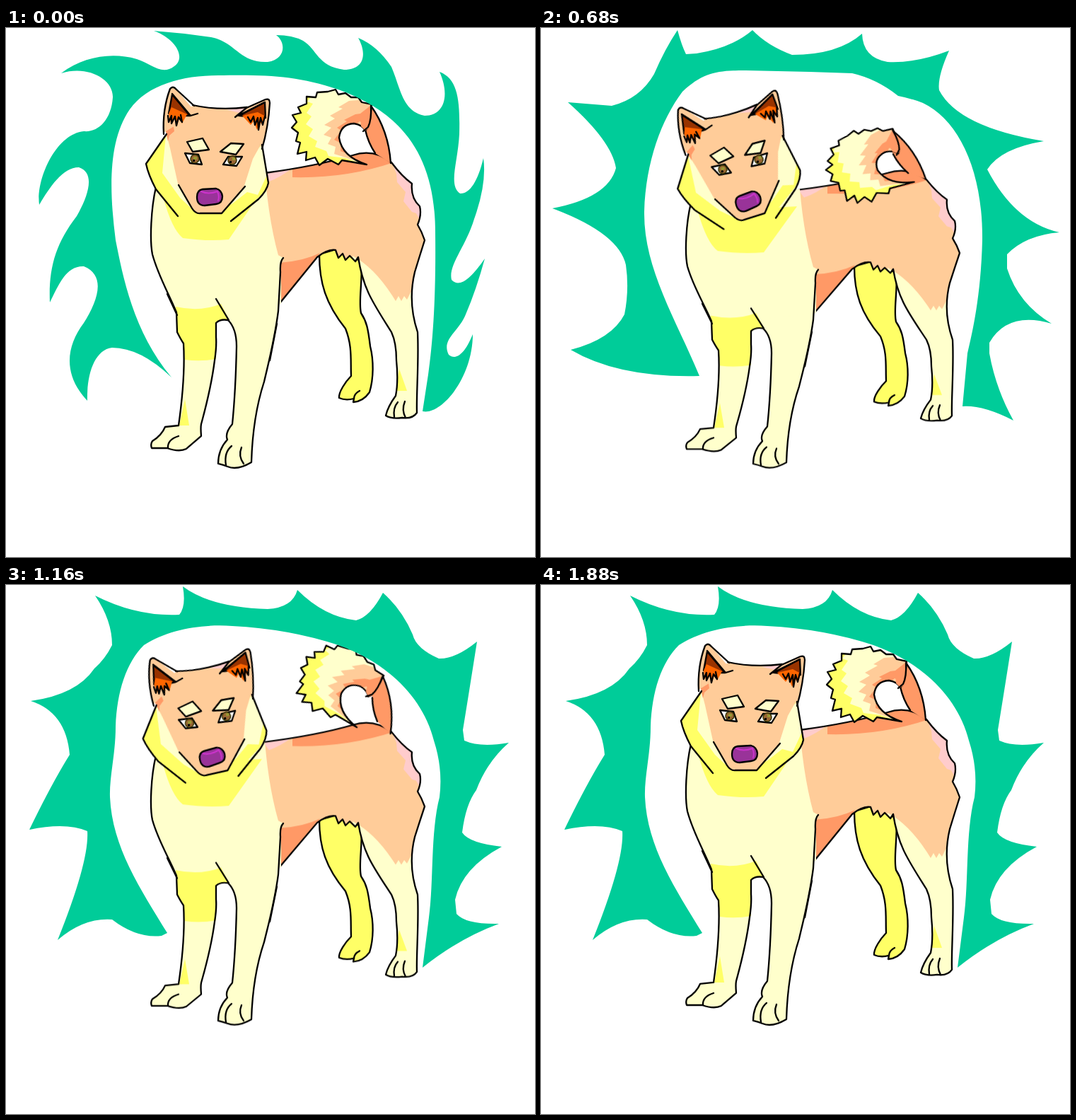
An HTML page without scripts for the animation above (1.92 s loop, 748 by 748 pixels).

```html
<!DOCTYPE html>
<html lang="en">
<head>
<meta charset="utf-8">
<title>Dog with green flames</title>
<style>
html, body { margin: 0; width: 100%; height: 100%; overflow: hidden; background: #fff; }
svg { display: block; width: 100%; height: 100%; }
path { stroke-linejoin: round; stroke-linecap: round; }

.line { fill: none; stroke: #000; stroke-width: 2.3; }
.ink { stroke: #000; stroke-width: 2.3; }
.tan { fill: #fc9; }
.orange { fill: #f96; }
.cream { fill: #ffc; }
.yellow { fill: #ff6; }
.pink { fill: #fcc; }
.rust { fill: #930; }
.fire { fill: #f60; }
.iris { fill: #963; stroke: #330; stroke-width: 1.5; }
.flames { fill: #0c9; }

:root {
  --in: cubic-bezier(.333, 0, .667, .333);
  --out: cubic-bezier(.333, .667, .667, 1);
}
.body, .head, .tail, .fluff { animation: 1.92s infinite; }

/* breathing: quadratic in, quadratic out */
.body { transform-origin: 0 620px; animation-name: breathe; }
.head { transform-origin: 288px 239px; animation-name: nod; }
@keyframes breathe {
  0% { transform: scaleY(1); animation-timing-function: var(--in); }
  50% { transform: scaleY(.94); animation-timing-function: var(--out); }
  100% { transform: scaleY(1); }
}
@keyframes nod {
  0% { transform: translate(0, 0) rotate(0deg); animation-timing-function: var(--in); }
  50% { transform: translate(5.5px, 6.5px) rotate(-18.5deg); animation-timing-function: var(--out); }
  100% { transform: translate(0, 0) rotate(0deg); }
}

/* the stem swings, the curl swings a bit further */
.tail { --swing: 14deg; transform-origin: 535px 190px; animation-name: wag; }
.fluff { --swing: 12deg; transform-origin: 512px 110px; animation-name: wag; }
@keyframes wag {
  0% { transform: rotate(0deg); animation-timing-function: var(--in); }
  33.333% { transform: rotate(calc(-1 * var(--swing))); animation-timing-function: cubic-bezier(.37, 0, .63, 1); }
  66.667% { transform: rotate(var(--swing)); animation-timing-function: var(--out); }
  100% { transform: rotate(0deg); }
}

/* flame poses run forth and back, in slots of 120 ms */
.flames path { opacity: 0; animation: .96s step-end infinite; }
.flames .wavy { animation-name: wavy; }
.flames .sharp { animation-name: sharp; }
.flames .wide { animation-name: wide; }
.flames .tall { animation-name: tall; }
@keyframes wavy {
  0% { opacity: 1; }
  12.5%, 100% { opacity: 0; }
}
@keyframes sharp {
  0%, 25% { opacity: 0; }
  12.5%, 87.5%, 100% { opacity: 1; }
}
@keyframes wide {
  0%, 37.5%, 87.5%, 100% { opacity: 0; }
  25%, 75% { opacity: 1; }
}
@keyframes tall {
  0%, 75%, 100% { opacity: 0; }
  37.5% { opacity: 1; }
}
</style>
</head>
<body>
<svg viewBox="0 0 748 748">
  <defs>
    <path id="torso" d="M366 205Q440 195 490 180Q520 170 545 190Q560 210 574 220Q572 240 585 252Q588 264 582 278Q588 288 592 300Q585 322 578 345C572 370 572 400 582 430C584 470 580 520 581 544Q575 553 560 551Q545 553 537 548Q540 535 551 520Q555 500 552 470Q552 445 545 430C520 390 505 370 498 324L494 330 486 322 480 328 476 319 470 325 466 314Q455 312 440 324L388 388H360L350 210Z"/>
    <path id="front" d="M212 225C205 255 203 300 207 320C215 350 230 375 241 402L242 430Q247 440 251 446C253 480 250 520 244 562L225 564Q220 576 207 584Q204 588 206 594L228 594Q245 600 255 595L276 577Q275 565 276 560C280 545 290 510 295 470Q298 450 297 437Q297 420 297 417Q303 411 314 413Q326 425 326 450C325 500 322 540 320 560Q309 573 313 582Q300 596 300 616Q308 618 313 620Q327 626 347 614C348 580 352 540 365 500C372 470 380 440 385 400L388 345Q387 330 392 325"/>
    <path id="curl" d="M517 108L503 105 498 98 488 98 480 92 470 94 466 87 455 90 440 91 438 98 425 97 425 107 413 112 417 120 405 123 411 133 404 141 413 148 410 160 416 162 412 178 425 175 424 187 437 183 443 194 455 185 470 193 475 187 510 193Q475 182 471 155Q473 136 492 135Q504 137 508 145L514 139Z"/>
    <clipPath id="inTorso"><use href="#torso"/></clipPath>
    <clipPath id="inCurl"><use href="#curl"/></clipPath>
  </defs>

  <g class="body">
    <path class="yellow ink" d="M443 320C443 360 452 390 480 425C490 450 487 470 488 492C480 500 470 515 471 523Q480 527 492 524L491 529Q505 528 514 515C520 495 520 470 515 450C512 425 510 415 502 403C498 385 505 355 502 330L470 312Z"/>
    <path class="line" d="M492 524Q492 517 500 513"/>

    <use href="#torso" class="tan"/>
    <g clip-path="url(#inTorso)">
      <path class="orange" d="M405 211L405 196 490 175 530 165 548 190Q480 213 405 211Z"/>
      <path class="pink" d="M360 200L405 198Q388 211 372 217Z"/>
      <path class="pink" d="M545 188L552 206 553 218 565 232 562 245 574 260 580 262 600 300V200Z"/>
      <path class="orange" d="M386 332Q420 330 444 318L388 392Z"/>
      <path class="cream" d="M490 322Q520 338 546 378L551 386 555 379 559 386 563 379 567 384 573 372 610 400V570H520Z"/>
      <path class="yellow" d="M556 482L567 513H551Z"/>
    </g>
    <use href="#torso" class="line"/>

    <use href="#front" class="cream"/>
    <path class="cream" d="M211 225L366 204Q372 280 389 335V390L300 400 238 395 207 320Z"/>
    <path class="yellow" d="M240 394Q275 402 304 390L315 412Q300 412 297 419V468Q275 472 253 469L251 446 242 430Z"/>
    <path class="yellow" d="M253 525L259 562H245Z"/>
    <path class="yellow" d="M222 238Q234 284 250 297Q285 302 315 299L362 230Z"/>
    <use href="#front" class="line"/>
    <path class="line" d="M297 383L315 413M228 376L242 406M383 418L373 470"/>
    <path class="line" d="M229 594Q228 582 244 577M311 618Q308 600 319 591M336 616Q328 605 333 593M549 550Q547 537 554 529M565 551Q559 540 564 528"/>

    <g class="tail">
      <path class="orange" d="M512 106Q541 145 544 191L522 177Q508 158 508 143L500 118Z"/>
      <path class="line" d="M516 110Q541 145 544 191M522 177Q512 162 508 144"/>
      <g class="fluff">
        <use href="#curl" class="cream"/>
        <g clip-path="url(#inCurl)">
          <path class="yellow" d="M440 85L426 104 434 107 425 120 432 125 424 136 434 143 428 153 440 160 437 168 453 174 456 181 480 184 515 196 400 205V100Z"/>
          <path class="tan" d="M525 100L485 103 470 112 476 114 458 124 465 128 450 137 460 141 449 151 460 155 455 164 466 168 464 178 480 183 512 194 530 140Z"/>
          <path class="orange" d="M516 119L494 122 478 130 482 132 468 141 474 145 464 158 474 163 473 174 488 180 515 194 492 170 480 150 500 132 516 140Z"/>
        </g>
        <use href="#curl" class="line"/>
        <path class="orange" d="M501 121L515 110 518 139 508 145 502 139Z"/>
        <path class="line" d="M516 110Q517 130 512 140L505 146"/>
      </g>
    </g>
  </g>

  <g class="head">
    <path class="yellow" d="M227 150L198 192Q201 207 212 228L243 266H318L357 240Q370 227 371 219L362 165Z"/>
    <path class="cream" d="M226 152L221 205 246 240 262 255 240 170ZM362 165L340 185 318 250 341 232 356 236 369 208Z"/>
    <path class="tan" d="M223 135L232 170 243 220 264 256Q268 263 275 262H305L336 226 349 185 363 160 366 130 337 114Q300 118 266 109Z"/>
    <path class="orange" d="M223 133L235 128 238 146 231 152 229 160Z"/>
    <path class="pink" d="M313 116L342 112 335 121Z"/>

    <path class="tan" d="M223 148Q221 115 232 86Q236 81 241 87L270 121 236 140Z"/>
    <path class="rust ink" d="M230 121L235 94 260 124 243 124Z"/>
    <path class="fire" d="M230 121L234 112 256 122 249 135 245 128 242 137 238 128 233 134Z"/>
    <path class="line" d="M229 124L230 133 234 124 234 135 239 125 241 138 244 126 249 133 247 123"/>
    <path class="line" d="M223 150Q221 115 232 86Q236 81 241 87L266 110M235 93L261 124 271 121"/>

    <path class="tan" d="M328 123L340 113 367 101Q373 99 373 106Q371 140 362 171L345 136Z"/>
    <path class="rust ink" d="M330 124L366 105 367 127 350 126Z"/>
    <path class="fire" d="M334 124L356 119 367 125 363 137 359 133 355 144 350 132 346 137Z"/>
    <path class="line" d="M342 126L346 133 350 125 352 137 356 127 357 144 360 127 363 137 366 125"/>
    <path class="line" d="M324 126L340 113 367 101Q373 99 373 106Q371 140 362 171M328 124L366 105"/>
    <path class="line" d="M264 109Q300 117 341 112"/>

    <path class="cream ink" d="M256 161L278 156 287 172 264 175Z"/>
    <path class="cream ink" d="M303 175L318 163 336 164 325 179Z"/>

    <path fill="#fff" class="ink" d="M253 177L272 179 277 193 260 191Z"/>
    <circle class="iris" cx="267" cy="185" r="6"/>
    <path fill="#fff" class="ink" d="M307 193L314 182 334 182 326 195Z"/>
    <circle class="iris" cx="320" cy="187" r="6"/>
    <path fill="#993" d="M265 182h5v4h-5zM320 183h4v4h-4z"/>
    <path d="M264 186h3v3h-3zM316 188h3v3h-3z"/>

    <path class="ink" fill="#939" d="M270 239Q270 229 278 228L297 227Q305 229 306 238Q306 248 297 249L281 251Q270 251 270 239Z"/>
    <path d="M276 231Q286 236 299 231Q302 238 300 244" fill="none" stroke="#c3c" stroke-width="2"/>

    <path class="line" d="M244 222L263 255Q268 263 275 262H305L338 224"/>
    <path class="line" d="M227 150L198 192Q201 207 212 228L243 266M362 165L371 219Q369 230 357 242L318 273"/>
  </g>

  <g class="flames">
    <path class="wavy" d="M234 494C180 430 165 350 155 300C146 230 144 160 175 115C200 80 250 67 300 67C370 66 410 67 470 87C560 120 607 180 607 290C608 380 604 440 597 490L589 542C615 548 660 495 660 433C648 463 635 470 626 462C615 440 640 430 650 405Q665 370 677 326C655 358 640 367 630 356C625 335 650 310 662 270Q680 220 675 184C667 218 655 235 642 234C625 222 639 190 641 150C642 105 640 72 613 62C628 95 620 124 592 124C560 118 558 85 545 55Q525 25 498 14C510 35 508 59 478 59C440 54 440 30 420 18Q405 10 382 10C396 20 396 44 370 48C330 50 325 20 290 13Q250 7 209 4C240 15 255 42 238 54C220 68 205 50 185 44C150 34 110 40 78 64C115 52 152 72 151 98C149 130 130 148 110 146C70 150 42 215 47 250C62 225 80 197 103 197C128 205 115 240 100 266C70 305 60 340 62 388C75 362 85 336 110 337C142 350 130 385 110 417C85 450 80 490 115 527C114 490 125 455 150 452Q190 452 234 494Z"/>
    <path class="wide" d="M222 494L222 488C175 420 144 340 144 260C146 190 160 130 190 95C220 65 250 60 290 61L380 62C450 65 500 85 540 110C585 140 613 190 615 250C618 320 612 400 602 450Q592 490 592 529Q640 519 692 528Q662 504 628 475V455Q638 400 712 394Q655 390 646 338Q655 272 722 254Q665 248 656 185Q656 150 690 107Q610 120 568 97Q563 75 560 21Q530 50 488 50Q455 40 436 5Q400 45 340 40Q300 25 284 4Q265 30 230 42Q185 42 153 12Q158 65 135 100Q105 135 43 138Q85 150 94 198Q85 235 45 270L12 292Q95 310 106 380Q105 415 60 485Q130 470 190 490Q215 497 222 494Z"/>
    <path class="tall" d="M224 492C190 410 145 340 146 260C148 190 170 130 200 90C230 62 250 60 290 60L380 62L440 64Q475 72 505 96Q525 100 540 106C590 130 625 200 624 300C622 380 610 430 603 460L596 535Q625 533 668 555Q643 510 634 460V445Q660 400 722 418Q675 390 659 340V320Q685 293 733 289Q670 275 631 200Q650 170 711 160Q590 140 563 88Q560 70 577 32Q530 50 490 48Q455 42 454 8Q420 38 355 38Q320 25 299 3Q270 28 220 36L205 37Q199 25 193 3Q175 30 160 65Q140 100 100 110L38 105Q100 160 106 198Q95 240 16 255Q110 290 120 335Q125 370 118 405Q100 440 42 455Q110 495 224 492Z"/>
    <path class="sharp" d="M228 492C190 430 150 370 147 300C146 270 155 240 155 200C157 150 170 110 195 85C230 62 280 55 320 58Q400 62 470 85C540 110 590 160 605 220Q618 260 613 300C600 350 605 420 598 470L589 541Q640 500 697 479Q650 480 637 465L635 445Q645 400 701 370Q655 365 645 350Q650 310 665 290Q680 250 711 223Q670 230 648 220L646 205Q655 150 666 80Q635 105 612 104Q580 90 575 70Q560 35 533 11Q515 45 495 50Q450 45 412 7Q405 32 370 34Q290 32 250 2Q255 30 245 42Q185 45 126 15Q150 50 150 85Q140 105 125 118Q100 155 35 164Q85 180 90 240Q65 280 33 346Q85 335 115 348Q118 390 73 502Q110 470 150 473Q185 500 220 496Z"/>
  </g>
</svg>
</body>
</html>
```
